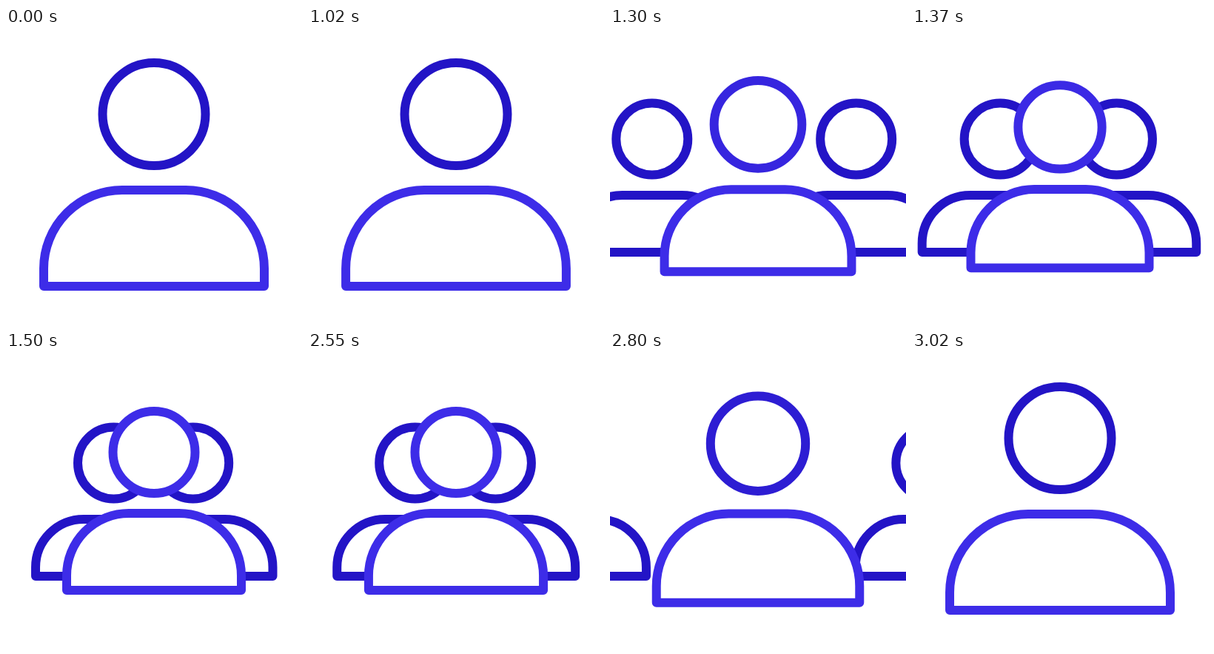
These frames come from a looping animation (400x400 px, 3050 ms). An HTML page:

```html
<!DOCTYPE html>
<html lang="en">
<head>
<meta charset="utf-8">
<title>One person, many people</title>
<style>
  html, body { margin: 0; width: 100%; height: 100%; overflow: hidden; background: #fff; }
  svg { display: block; width: 100%; height: 100%; }
  circle, path { fill: #fff; stroke-width: 12; stroke-linejoin: round; }
  .side { stroke: #2314c6; }
  #body { stroke: #3d2ce8; }
</style>
</head>
<body>
<svg viewBox="0 0 400 400">
  <g id="left" class="side"><path/><circle cy="150" r="48.5"/></g>
  <g id="right" class="side"><path/><circle cy="150" r="48.5"/></g>
  <path id="body"/>
  <circle id="head" cx="200"/>
</svg>
<script>
const LOOP = 3050, MOVE = 500, GATHER = 1000, PART = 2525, STEP = 25;
const DARK = [35, 20, 198], LIGHT = [61, 44, 232];
const $ = selector => document.querySelector(selector);
const lerp = (a, b, p) => a + (b - a) * p;
const clamp = x => Math.min(1, Math.max(0, x));

// cubic-bezier(.6, 0, .4, 1), solved by bisection
function ease(x) {
  let lo = 0, hi = 1;
  for (let i = 0; i < 24; i++) {
    const s = (lo + hi) / 2, r = 1 - s;
    if (1.8 * s * r * r + 1.2 * s * s * r + s ** 3 < x) lo = s; else hi = s;
  }
  return lo * lo * (3 - 2 * lo);
}

// Shoulders: flat base, two rounded top corners
function shoulders(cx, half, top, base, r) {
  const l = cx - half, w = 2 * (half - r);
  return `M${l} ${base}V${top + r}a${r} ${r} 0 0 1 ${r} ${-r}h${w}a${r} ${r} 0 0 1 ${r} ${r}V${base}Z`;
}

function setSide(id, headX, bodyX) {
  $(id + ' circle').setAttribute('cx', headX);
  $(id + ' path').setAttribute('d', shoulders(bodyX, 105.5, 226, 303, 65));
}
setSide('#left', 145.5, 145.5);
setSide('#right', 252.7, 255);

const left = $('#left'), right = $('#right'), head = $('#head'), body = $('#body');

function draw(p) {
  left.setAttribute('transform', `translate(${-325 * (1 - p)})`);
  right.setAttribute('transform', `translate(${293 * (1 - p)})`);
  head.setAttribute('cy', lerp(116.5, 135.5, p));
  head.setAttribute('r', lerp(69.5, 55.5, p));
  head.setAttribute('stroke', `rgb(${DARK.map((c, i) => Math.round(lerp(c, LIGHT[i], p)))})`);
  body.setAttribute('d', shoulders(200, lerp(149, 118, p), lerp(219, 218, p),
    lerp(349, 322, p), lerp(106, 84, p)));
}

// 40 steps a second, each starting on a whole 10 ms
function frame() {
  const tick = Math.floor(performance.now() % LOOP / 10) * 10;
  const t = Math.floor((tick + 5) / STEP) * STEP;
  draw(ease(clamp((t - GATHER) / MOVE)) - ease(clamp((t - PART) / MOVE)));
  requestAnimationFrame(frame);
}
frame();
</script>
</body>
</html>
```
